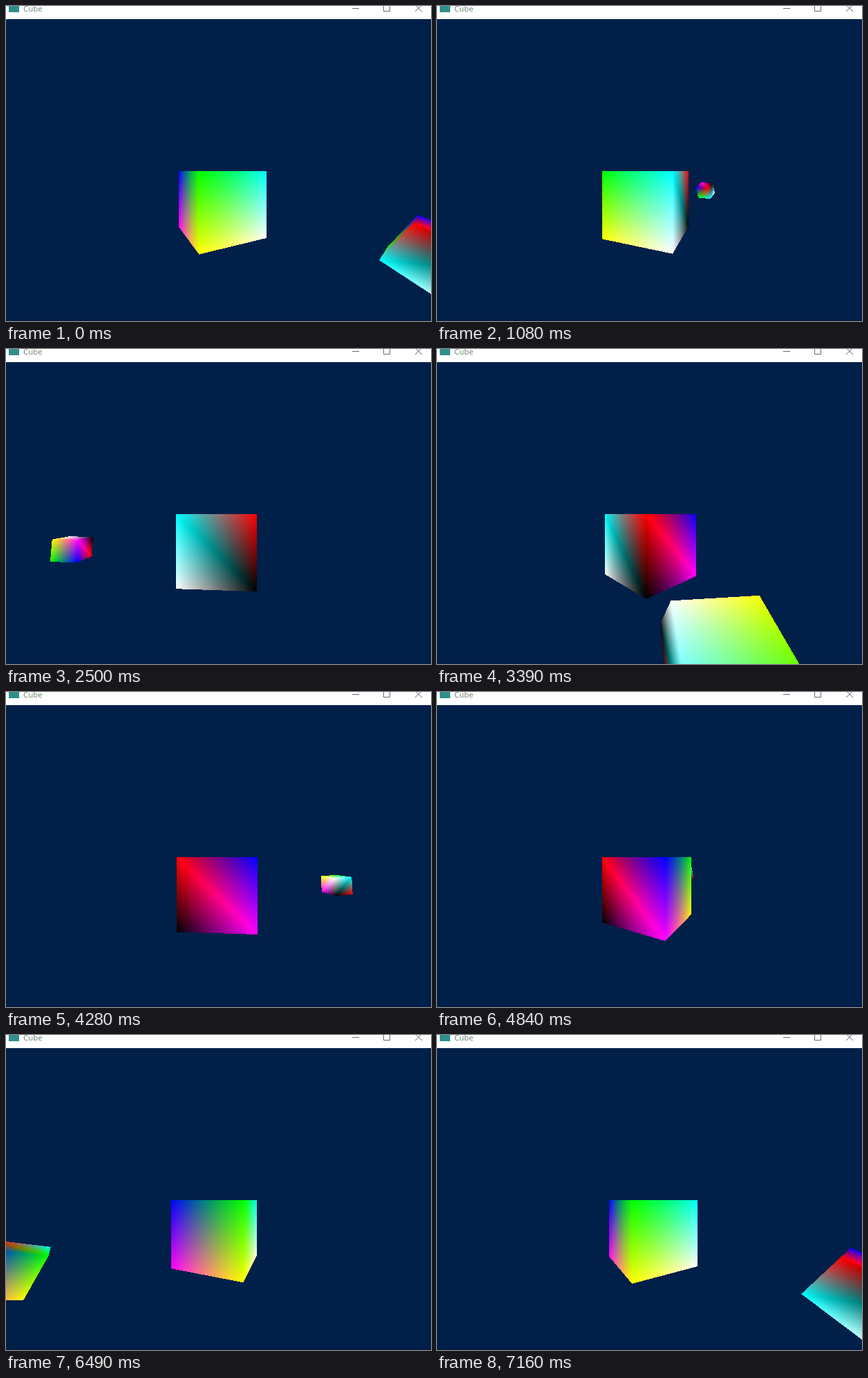
Animation, 615 px wide and 456 px high, one loop 7270 ms. Source, as an HTML page with a canvas:

```html
<!DOCTYPE html>
<html lang="en">
<head>
<meta charset="utf-8">
<title>Cube</title>
<style>
  html, body { margin: 0; width: 100%; height: 100%; overflow: hidden; background: #00204a; }
  canvas, svg { position: absolute; left: 0; top: 0; display: block; }
</style>
</head>
<body>
<svg width="615" height="456" viewBox="0 0 615 456">
  <rect width="615" height="456" fill="#00204a"/>
  <rect y="454" width="615" height="2" fill="#001c40"/>
  <rect width="615" height="19" fill="#fff"/>
  <rect x="4" y="-3" width="15" height="12" fill="#2f8f8c"/>
  <text x="25" y="8" font-family="'Open Sans', 'Noto Sans', sans-serif" font-size="11.5" fill="#6d8578">Cube</text>
  <g fill="none" stroke="#6a6470">
    <path d="M501 3.5h10M546.5 -1.5h9v9h-9zM592 -1.5l10 9.5M602 -1.5l-10 9.5"/>
  </g>
</svg>
<canvas id="scene" width="615" height="456"></canvas>
<script>
const W = 615, H = 456, LOOP = 7270;
const CENTER_X = 308, CENTER_Y = 239, FOCAL_X = 235, FOCAL_Y = 220.5;
const EYE_HEIGHT = 1, EYE_DISTANCE = 5;

const ctx = document.getElementById('scene').getContext('2d');
const image = ctx.createImageData(W, H);
const pixels = new Uint32Array(image.data.buffer);
const depth = new Float32Array(W * H);

// Corners 0-3 run around the top, 4-7 around the bottom.
const ring = [[-1, -1], [1, -1], [1, 1], [-1, 1]];
const corners = [1, -1].flatMap(y => ring.map(([x, z]) => [x, y, z]));
const colors = ['001', '010', '011', '100', '101', '110', '111', '000']
  .map(bits => [...bits].map(bit => bit * 255));
const triangles = ['310', '213', '054', '150', '347', '043', '165', '261', '276', '372', '645', '746']
  .map(t => [...t].map(Number));

// The picture steps in bursts of seven, on a clock of 10 ms.
const bursts = [[100, 740], [860, 1510], [1630, 2290], [2390, 3050], [3170, 3830],
  [3950, 4620], [4720, 5390], [5510, 6160], [6280, 6950]];
const stepTimes = [0, ...bursts.flatMap(([a, b]) =>
  Array.from({ length: 7 }, (_, i) => Math.floor((a + (b - a) * i / 6) / 10) * 10)), 7060, 7160];

// Rotation in degrees at a few steps.
const angleKeys = [[0, 63.4], [7, 99.6], [10, 113.6], [21, 170.3], [23, 184.2], [31, 228.1],
  [35, 249.5], [39, 273.6], [42, 290], [50, 333.9], [56, 370.5], [63, 410.7], [65, 421.4]];

function angleAt(step) {
  const i = Math.max(1, angleKeys.findIndex(key => key[0] >= step));
  const [s0, a0] = angleKeys[i - 1], [s1, a1] = angleKeys[i];
  return (a0 + (a1 - a0) * (step - s0) / (s1 - s0)) * Math.PI / 180;
}

function rotateY([x, y, z], a) {
  const c = Math.cos(a), s = Math.sin(a);
  return [x * c + z * s, y, z * c - x * s];
}

function rotateZ([x, y, z], a) {
  const c = Math.cos(a), s = Math.sin(a);
  return [x * c - y * s, x * s + y * c, z];
}

function orbit(corner, a) {
  const [x, y, z] = rotateZ(corner.map(v => v * 0.3), -a);
  return rotateY([x - 4, y, z], -2 * a);
}

function project([x, y, z]) {
  const inv = 1 / (z + EYE_DISTANCE);
  return { x: CENTER_X + FOCAL_X * x * inv, y: CENTER_Y + FOCAL_Y * (EYE_HEIGHT - y) * inv, inv };
}

const cross = (a, b, x, y) => (b.x - a.x) * (y - a.y) - (b.y - a.y) * (x - a.x);

function fillTriangle(a, b, c, [ca, cb, cc]) {
  const area = cross(a, b, c.x, c.y);
  if (Math.abs(area) < 1e-6) return;
  const x0 = Math.max(0, Math.floor(Math.min(a.x, b.x, c.x)));
  const x1 = Math.min(W, Math.ceil(Math.max(a.x, b.x, c.x)));
  const y0 = Math.max(0, Math.floor(Math.min(a.y, b.y, c.y)));
  const y1 = Math.min(H, Math.ceil(Math.max(a.y, b.y, c.y)));
  for (let y = y0; y < y1; y++) {
    for (let x = x0; x < x1; x++) {
      const px = x + 0.5, py = y + 0.5;
      let u = cross(b, c, px, py) / area, v = cross(c, a, px, py) / area, w = 1 - u - v;
      if (u < 0 || v < 0 || w < -1e-9) continue;
      u *= a.inv; v *= b.inv; w *= c.inv;
      const inv = u + v + w, at = y * W + x;
      if (inv <= depth[at]) continue;
      depth[at] = inv;
      const mix = k => Math.round(Math.max(0, (u * ca[k] + v * cb[k] + w * cc[k]) / inv));
      pixels[at] = (255 << 24 | mix(2) << 16 | mix(1) << 8 | mix(0)) >>> 0;
    }
  }
}

function drawCube(place) {
  const points = corners.map(corner => project(place(corner)));
  for (const t of triangles) {
    fillTriangle(...t.map(i => points[i]), t.map(i => colors[i]));
  }
}

function draw(step) {
  const angle = angleAt(step);
  pixels.fill(0);
  depth.fill(0);
  drawCube(corner => rotateY(corner, angle));
  drawCube(corner => orbit(corner, angle));
  ctx.putImageData(image, 0, 0);
}

let shown = -1;
const start = performance.now();

function tick() {
  const time = (performance.now() - start) % LOOP;
  const step = stepTimes.filter(t => t <= time).length - 1;
  if (step !== shown) draw(shown = step);
  requestAnimationFrame(tick);
}
tick();
</script>
</body>
</html>
```
